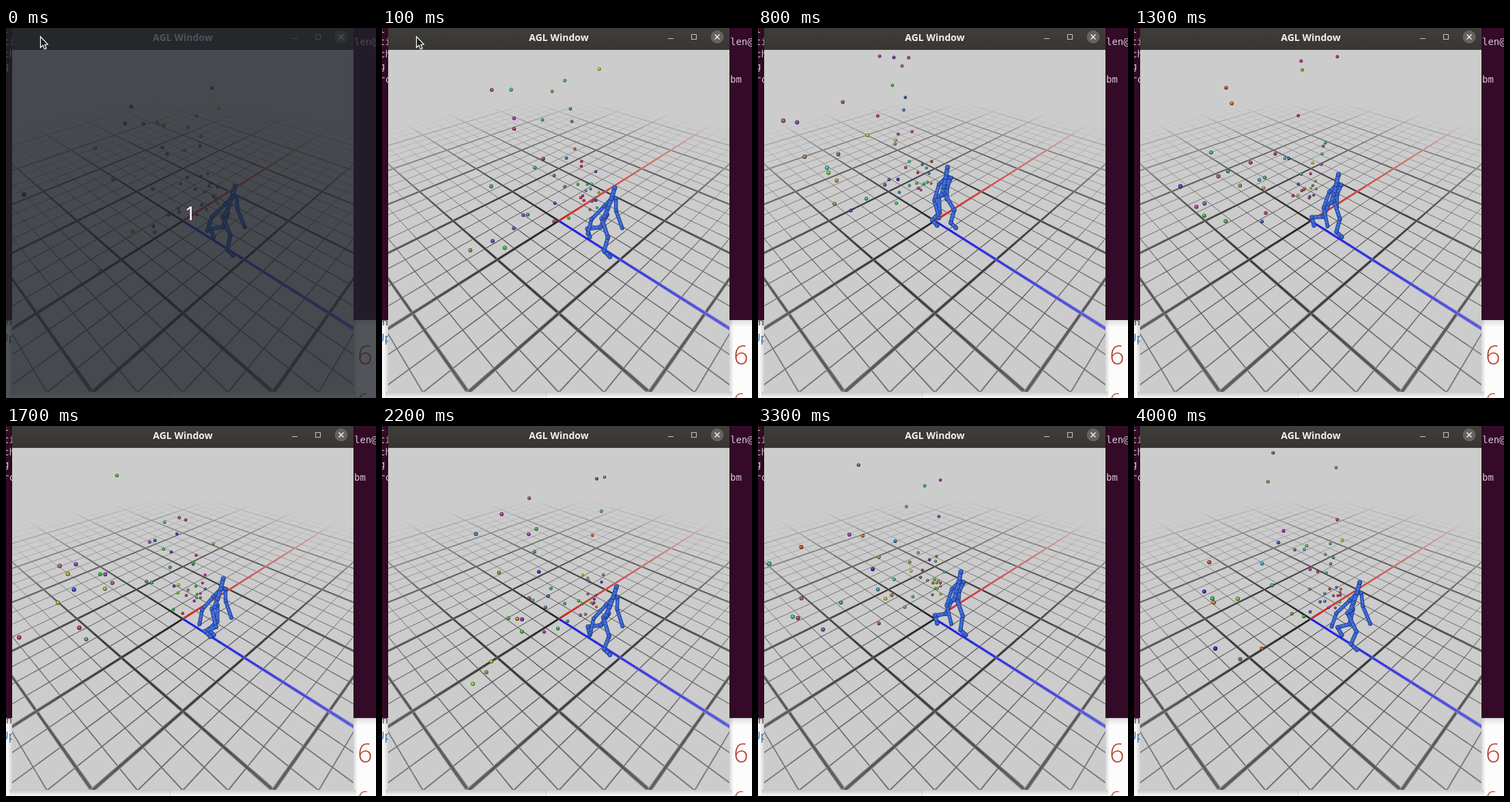
Write an HTML page with a canvas that moves like this. It is 542 by 541 pixels and loops after 4.1 s.

```html
<!DOCTYPE html>
<html lang="en">
<head>
<meta charset="utf-8">
<title>Walking figure</title>
<style>
html, body { margin: 0; width: 100%; height: 100%; overflow: hidden; background: #fff; }
canvas { display: block; width: 542px; height: 541px; }
</style>
</head>
<body>
<canvas id="stage" width="542" height="541"></canvas>
<script>
const W = 542, H = 541, LOOP = 4100, STEP = 100;
const WALK = 2050, WALK_START = 575;
const SKY = [204, 204, 204];
const ctx = document.getElementById('stage').getContext('2d');

function rect(g, color, x, y, w, h) {
  g.fillStyle = color;
  g.fillRect(x, y, w, h);
}

function label(g, text, x, y, font, color, align = 'left') {
  g.font = font;
  g.fillStyle = color;
  g.textAlign = align;
  g.fillText(text, x, y);
}

function polyline(g, points, width, color) {
  g.strokeStyle = color;
  g.lineWidth = width;
  g.beginPath();
  points.forEach(([x, y]) => g.lineTo(x, y));
  g.stroke();
}

function disc(g, x, y, r, color) {
  g.fillStyle = color;
  g.beginPath();
  g.arc(x, y, r, 0, Math.PI * 2);
  g.fill();
}

function shade(g, x0, y0, x1, y1, alpha, area) {
  const fill = g.createLinearGradient(x0, y0, x1, y1);
  fill.addColorStop(0, `rgba(0,0,0,${alpha})`);
  fill.addColorStop(1, 'rgba(0,0,0,0)');
  rect(g, fill, ...area);
}

function layer(paint) {
  const c = document.createElement('canvas');
  c.width = W;
  c.height = H;
  paint(c.getContext('2d'));
  return c;
}

function clipToScene(g) {
  g.beginPath();
  g.rect(9, 32, 500, 500);
  g.clip();
}

// ---- desktop behind the window ----
const MONO = '14px "DejaVu Sans Mono", monospace';
const SANS = '"Open Sans", sans-serif';

function paintDesktop(g) {
  rect(g, '#fcfcfc', 0, 0, W, H);
  rect(g, '#f6f6f6', 0, 427, 240, 114);
  rect(g, '#dcdcdc', 240, 532, 1, 9);
  label(g, 'm', -5, 435, `15px ${SANS}`, '#444');
  label(g, 'Up', -8, 459, `16px ${SANS}`, '#2f6cab');
  label(g, '6', 515, 492, `300 38px ${SANS}`, '#b5402c');
  label(g, '6', 515, 555, `300 30px ${SANS}`, '#b5402c');
  shade(g, 0, 427, 0, 437, 0.12, [0, 427, W, 10]);
  rect(g, '#350a28', 0, 0, W, 427);
  ['t', 'ti', 'ch', 'g'].forEach((s, i) => label(g, s, -4, 7 + i * 18, MONO, '#d3ccd1'));
  label(g, 'len@', 510, 25, MONO, '#d3ccd1');
  shade(g, 509, 0, 515, 0, 0.15, [509, 0, 6, 532]);
  shade(g, 9, 0, 3, 0, 0.15, [3, 0, 6, 532]);
  shade(g, 0, 532, 0, 541, 0.2, [5, 532, 508, 9]);
}

// ---- camera: a runs along the red axis, b along the blue one, z is height ----
function project(a, b, z = 0) {
  const u = (a + b) * 0.1788, v = (a - b) * 0.1788, h = z * 0.2528;
  const depth = 1 + 0.7766 * v - 0.63 * h;
  return [259 + 433 * u / depth, 282 - (272.8 * v + 336.3 * h) / depth, depth];
}

function groundLine(g, at, from, to, width, color) {
  const ds = 0.2, n = Math.round((to - from) / ds);
  const mix = k => `rgb(${color.map((c, i) => Math.round(SKY[i] + (c - SKY[i]) * k))})`;
  for (let i = 0; i < n; i++) {
    const s = from + i * ds;
    const far = Math.hypot(...at(s + ds / 2)) / 5;
    const p = project(...at(s)), q = project(...at(s + ds * 1.03));
    if (far >= 1 || p[2] < 0.3 || q[2] < 0.3) continue;
    const fade = 1 - far ** 1.15;
    const w = width / ((p[2] + q[2]) / 2) ** 1.4;
    const ends = [p.slice(0, 2), q.slice(0, 2)];
    if (width > 1) polyline(g, ends, w * 1.5, mix(fade * 0.45));
    polyline(g, ends, w, mix(fade));
  }
}

function gridLines(g, major) {
  const cells = 4, reach = 5 * cells;
  const width = major ? 2.1 : 0.95, color = major ? [26, 26, 26] : [62, 62, 62];
  for (let k = -reach; k <= reach; k++) {
    if ((k % cells === 0) !== major) continue;
    groundLine(g, s => [s, k / cells], -5, 5, width, color);
    groundLine(g, s => [k / cells, s], -5, 5, width, color);
  }
}

function paintWindow(g) {
  rect(g, `rgb(${SKY})`, 9, 32, 500, 500);
  g.save();
  clipToScene(g);
  gridLines(g, false);
  gridLines(g, true);
  groundLine(g, s => [s, 0], 0, 5, 2.2, [218, 28, 28]);
  groundLine(g, s => [0, s], 0, 5, 2.2, [18, 18, 230]);
  g.restore();

  const bar = g.createLinearGradient(0, 0, 0, 32);
  bar.addColorStop(0, '#403e3b');
  bar.addColorStop(1, '#383633');
  rect(g, bar, 9, 0, 500, 32);
  label(g, 'AGL Window', 259, 19, `bold 14px ${SANS}`, '#f2f0ec', 'center');
  rect(g, '#c9c6c1', 419, 15, 8, 1);
  g.strokeStyle = '#c9c6c1';
  g.lineWidth = 1;
  g.strokeRect(453.5, 9.5, 7, 7);
  disc(g, 491, 13, 9.5, '#66635f');
  for (const d of [3.5, -3.5]) polyline(g, [[491 - d, 9.5], [491 + d, 16.5]], 1.4, '#f4f2ef');
}

const desktop = layer(paintDesktop);
const appWindow = layer(paintWindow);

// ---- walking figure: planted feet, two-bone legs, swinging arms ----
const SWING = 900, STRIDE = 1840, BONE = 0.235;
const NEAR = { side: -1, steps: [{ start: 650, from: 0.09, to: 0.89 }] };
const FAR = { side: 1, steps: [{ start: -300, from: 0.05, to: 0.5 }, { start: 1650, from: 0.5, to: 1.3 }] };

const clamp = x => Math.max(0, Math.min(1, x));
const smooth = x => x * x * (3 - 2 * x);
const bodyAt = t => 0.02 + 0.00044 * t;
const headAt = t => project(0, bodyAt(t) + 0.08, 0.88);

function legPoints({ side, steps }, t) {
  const a = side * 0.048, hip = [bodyAt(t), 0.47];
  const step = steps.findLast(s => t >= s.start) || steps[0];
  const f = clamp((t - step.start) / SWING);
  const toe = [step.from + (step.to - step.from) * smooth(f), 0.05 * Math.sin(Math.PI * f)];
  const lift = 1.2 * clamp((hip[0] - toe[0]) / 0.25);
  const ankle = [toe[0] - 0.09 * Math.cos(lift), toe[1] + 0.03 + 0.09 * Math.sin(lift)];
  const db = hip[0] - ankle[0], dz = hip[1] - ankle[1], len = Math.hypot(db, dz);
  const bend = Math.sqrt(Math.max(0, BONE ** 2 - len ** 2 / 4)) / len;
  const knee = [ankle[0] + db / 2 + dz * bend, ankle[1] + dz / 2 - db * bend];
  return [hip, knee, ankle, toe].map(([b, z]) => project(a, b, z));
}

function armPoints(side, t) {
  const swing = -side * Math.cos(2 * Math.PI * (t - 450) / STRIDE);
  const b = bodyAt(t) + 0.05, out = side < 0 ? 0.1 : 0.05;
  return [
    project(side * 0.1, b, 0.69),
    project(side * (0.12 + out / 2), b - 0.05 + 0.06 * swing, 0.5),
    project(side * (0.1 + out), b + 0.14 * swing, 0.31)
  ];
}

function beads(points, size) {
  const tone = '#3a66d6', edge = '#223f8a';
  ctx.lineCap = ctx.lineJoin = 'round';
  polyline(ctx, points, size, edge);
  polyline(ctx, points, size - 2, tone);
  points.slice(1).forEach(([x1, y1], i) => {
    const [x0, y0] = points[i];
    const n = Math.max(1, Math.round(Math.hypot(x1 - x0, y1 - y0) / 5));
    for (let k = 0; k <= n; k++) {
      disc(ctx, x0 + (x1 - x0) * k / n - 0.5, y0 + (y1 - y0) * k / n - 0.8, size * 0.2, '#4e7ce6');
    }
  });
  points.forEach(([x, y]) => {
    disc(ctx, x, y, size * 0.56, edge);
    disc(ctx, x - 0.3, y - 0.4, size * 0.42, tone);
  });
}

function drawFigure(t) {
  const b = bodyAt(t);
  const neck = project(0, b + 0.06, 0.74), chest = project(0, b + 0.03, 0.6), pelvis = project(0, b, 0.47);
  const left = armPoints(-1, t), right = armPoints(1, t);
  beads(right, 5.5);
  beads(legPoints(FAR, t), 6);
  beads(legPoints(NEAR, t), 6);
  beads([left[0], neck, right[0]], 5.5);
  beads([pelvis, chest, neck, headAt(t)], 6.5);
  beads(left, 5.5);
}

// ---- particles thrown from the figure's back ----
const COUNT = 44, LIVES = 8;

function random(n) {
  const s = Math.sin(n * 127.1 + 11.7) * 43758.5453;
  return s - Math.floor(s);
}

function drawParticles(time, t) {
  const [hx, hy] = headAt(t);
  for (let i = 0; i < COUNT; i++) {
    const clock = time / LOOP * LIVES + i / COUNT;
    const age = clock % 1, seed = i * 53 + Math.floor(clock) % LIVES * 7;
    const angle = (-8 + 134 * random(seed)) * Math.PI / 180;
    const reach = (180 + 105 * random(seed + 1)) * age ** 1.6 + 8;
    const x = hx - 24 - Math.sin(angle) * reach + 12 * (random(seed + 2) - 0.5);
    const y = hy + 25 - Math.cos(angle) * reach * 0.85 + 22 * (random(seed + 3) - 0.5);
    const r = 1.5 + 1.3 * age * Math.max(0.4, Math.sin(angle));
    const hue = 360 * random(seed + 4), sat = 25 + 45 * random(seed + 5);
    disc(ctx, x, y, r + 0.5, `hsl(${hue},${sat}%,24%)`);
    disc(ctx, x - 0.2, y - 0.3, r - 0.3, `hsl(${hue},${sat}%,48%)`);
    disc(ctx, x - 0.5, y - 0.7, r * 0.35, `hsl(${hue},${sat}%,64%)`);
  }
}

function drawCursor() {
  const arrow = new Path2D('M50.5 12.5v16l3.5-3.3 2.4 5.8 2.8-1.2-2.4-5.5 4.5-.3z');
  ctx.lineJoin = 'miter';
  ctx.fillStyle = '#1c1c1c';
  ctx.fill(arrow);
  ctx.strokeStyle = '#fff';
  ctx.lineWidth = 1.2;
  ctx.stroke(arrow);
}

function draw(time) {
  const walk = (time - WALK_START + WALK) % WALK;
  const counting = time < STEP;
  ctx.drawImage(desktop, 0, 0);
  if (!counting) {
    label(ctx, 'rc', -4, 80, MONO, '#d3ccd1');
    label(ctx, 'bm', 510, 80, MONO, '#d3ccd1');
  }
  ctx.drawImage(appWindow, 0, 0);
  ctx.save();
  clipToScene(ctx);
  drawParticles(time, walk);
  drawFigure(walk);
  ctx.restore();
  if (counting) {
    rect(ctx, 'rgba(31,35,41,0.77)', 0, 0, W, H);
    label(ctx, '1', 270, 281, '500 28px "Noto Sans", sans-serif', '#fff', 'center');
  }
  if (time < 400) drawCursor();
}

const start = performance.now();
function frame() {
  const time = (performance.now() - start) % LOOP;
  draw(Math.floor(time / STEP) * STEP);
  requestAnimationFrame(frame);
}
frame();
</script>
</body>
</html>
```
